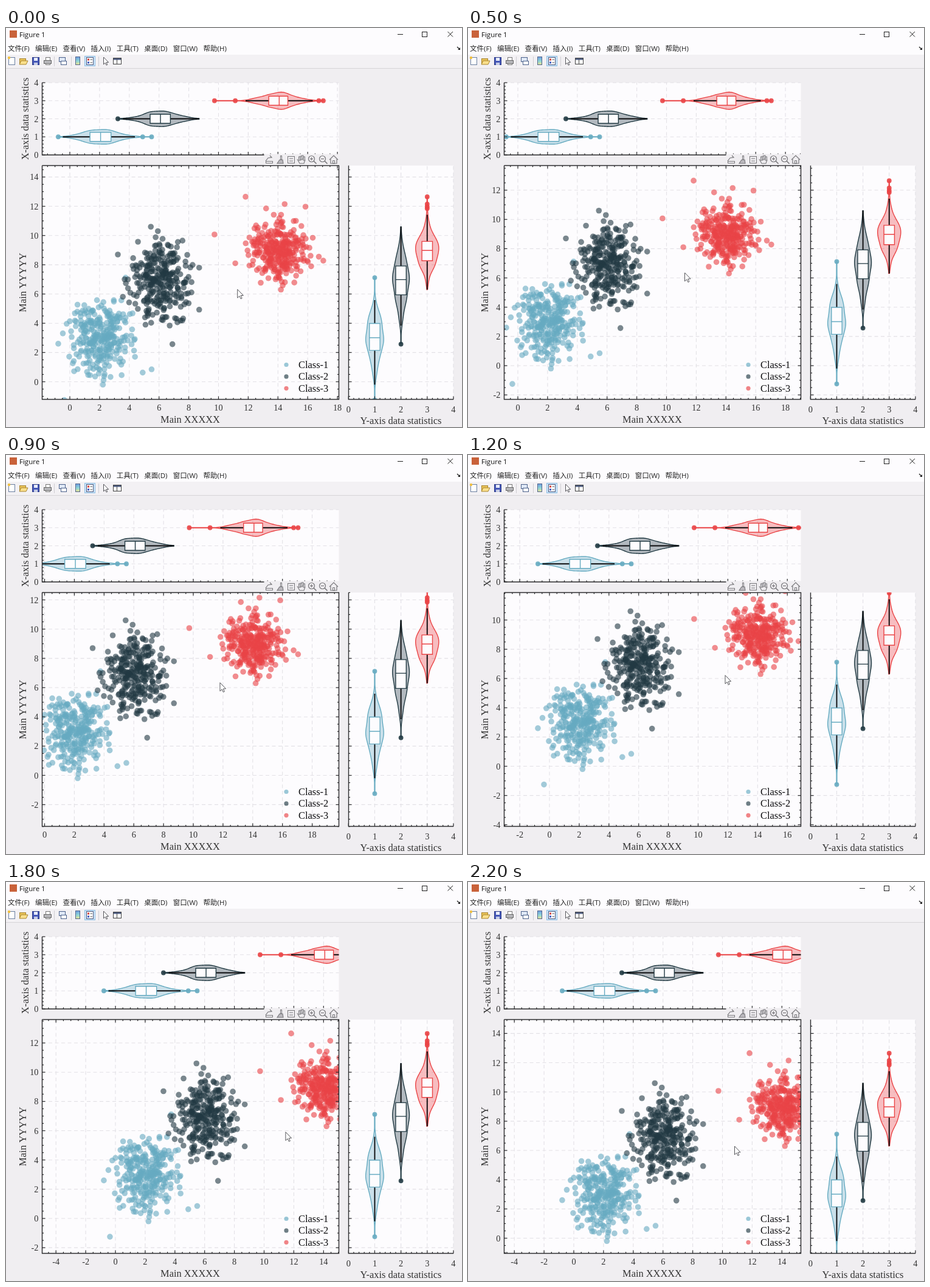
An HTML page with a canvas for the animation above (2.3 s loop, 750 by 657 pixels).

```html
<!DOCTYPE html>
<html lang="zh-CN">
<head>
<meta charset="utf-8">
<title>Figure 1</title>
<style>
html, body { margin: 0; width: 100%; height: 100%; overflow: hidden; background: #f0eef1 }
canvas { display: block }
</style>
</head>
<body>
<canvas id="stage" width="750" height="657"></canvas>
<script>
const g = document.getElementById('stage').getContext('2d');
const SERIF = '"Liberation Serif", "Times New Roman", serif';
const UI = '"Open Sans", "Noto Sans CJK SC", "Noto Sans CJK", sans-serif';
const INK = '#2b2b2d', PAPER = '#fdfcfe', BACK = '#f0eef1', GRID = '#e3e1e6';
const LOOP = 2300, STEP = 100, LAG = 60;

// Where the plot's zero point is dragged: time, x, y.
const DRAG = [
  [0, 105, 582.5], [500, 82, 556], [900, 63.5, 527.5], [1200, 134, 512.5],
  [1500, 174, 517.5], [1800, 180, 554], [2200, 174, 586.5], [2260, 160, 584]
];

// Each class is a round cloud plus a few far points.
const CLASSES = [
  { color: '#66abc1', centre: [2.07, 2.95], spread: [1.05, 1.36],
    far: [[-.78, 2.6], [-.37, -1.25], [4.9, .63], [5.5, .85], [3.75, 7.12]] },
  { color: '#223a43', centre: [6.02, 6.9], spread: [1.06, 1.44],
    far: [[3.23, 8.7], [6.9, 2.57], [5.45, 10.6], [8.7, 7.8], [8.7, 4.93]] },
  { color: '#ea4446', centre: [14.08, 8.97], spread: [1, 1.05],
    far: [[11.82, 12.65], [14.45, 12.15], [15.85, 11.97], [13.2, 11.85], [9.73, 10.07],
      [11.13, 8.1], [16.75, 8.55], [17.05, 8.28], [14.2, 6.3]] }
];

let seed = 7;
const random = () => (seed = seed * 16807 % 2147483647) / 2147483647;

// Normal cloud: evenly ranked radii, loosely spread angles.
function cloud({ centre, spread, far }, count = 290) {
  const list = Array.from({ length: count }, (_, k) => {
    const r = Math.sqrt(-2 * Math.log(1 - .95 * (k + .5) / count));
    const a = k * 2.39996 + random() * 2.5;
    return [centre[0] + spread[0] * r * Math.cos(a), centre[1] + spread[1] * r * Math.sin(a)];
  });
  return [...list.sort(() => random() - .5), ...far];
}

// Quartiles, whiskers, outliers and a smoothed density of one column.
function summarize(values) {
  const s = values.slice().sort((a, b) => a - b), n = s.length;
  const [q1, mid, q3] = [.25, .5, .75].map(q => s[Math.round(q * (n - 1))]);
  const reach = 1.5 * (q3 - q1);
  const normal = s.filter(v => v >= q1 - reach && v <= q3 + reach);
  const band = .34 * (q3 - q1) / 1.35;
  const outline = Array.from({ length: 81 }, (_, k) => {
    const v = s[0] + (s[n - 1] - s[0]) * k / 80;
    const sum = s.reduce((t, p) => t + Math.exp(-(((v - p) / band) ** 2) / 2), 0);
    return [v, sum / (n * band * Math.sqrt(2 * Math.PI))];
  });
  return { q1, mid, q3, lo: normal[0], hi: normal[normal.length - 1], outline,
    outliers: s.filter(v => !normal.includes(v)) };
}

for (const c of CLASSES) {
  c.points = cloud(c);
  c.stats = [0, 1].map(axis => summarize(c.points.map(p => p[axis])));
}

// Smooth curve through rows of [position, value...]; c picks the column.
function spline(rows, t, c) {
  const n = rows.length - 1;
  if (t <= rows[0][0]) return rows[0][c];
  if (t >= rows[n][0]) return rows[n][c];
  const gap = j => rows[j + 1][0] - rows[j][0];
  const slope = j => (rows[j + 1][c] - rows[j][c]) / gap(j);
  const tangent = j => j === 0 ? slope(0) : j === n ? slope(n - 1)
    : (gap(j) * slope(j - 1) + gap(j - 1) * slope(j)) / (gap(j) + gap(j - 1));
  const i = rows.findIndex(r => r[0] > t) - 1, h = gap(i), u = (t - rows[i][0]) / h, w = 1 - u;
  return w * w * (1 + 2 * u) * rows[i][c] + u * u * (3 - 2 * u) * rows[i + 1][c]
    + h * u * w * (w * tangent(i) - u * tangent(i + 1));
}

function rect(x, y, w, h, fill, stroke, width = 1) {
  if (fill) { g.fillStyle = fill; g.fillRect(x, y, w, h); }
  if (stroke) { g.strokeStyle = stroke; g.lineWidth = width; g.strokeRect(x, y, w, h); }
}

function path(list, stroke, width = 1, fill) {
  g.beginPath();
  list.forEach(p => g.lineTo(...p));
  if (fill) { g.closePath(); g.fillStyle = fill; g.fill(); }
  if (stroke) { g.strokeStyle = stroke; g.lineWidth = width; g.stroke(); }
}

const line = (x0, y0, x1, y1, color, width) => path([[x0, y0], [x1, y1]], color, width);

function disc(x, y, r, fill, stroke, width = 1.2) {
  g.beginPath();
  g.arc(x, y, r, 0, 7);
  if (fill) { g.fillStyle = fill; g.fill(); }
  if (stroke) { g.strokeStyle = stroke; g.lineWidth = width; g.stroke(); }
}

function faded(alpha, draw) {
  g.globalAlpha = alpha;
  draw();
  g.globalAlpha = 1;
}

// Returns the width of the text.
function text(s, x, y, size, { font = SERIF, align = 'left', color = '#333', turn = 0 } = {}) {
  g.save();
  g.translate(x, y);
  g.rotate(turn);
  g.font = `${size}px ${font}`;
  g.textAlign = align;
  g.fillStyle = color;
  g.fillText(s, 0, 0);
  const { width } = g.measureText(s);
  g.restore();
  return width;
}

// Visible multiples of a step; there are `parts` of them per unit of `major`.
function ticks(map, a, b, major, parts = 1) {
  const list = [];
  for (let k = -12 * parts; k <= 12 * parts; k++) {
    const v = k * major / parts;
    if (map(v) >= a - .8 && map(v) <= b + .8) list.push([v, k % parts ? 2.6 : 5]);
  }
  return list;
}

function panel([l, t, r, b], mapX, mapY, stepX, stepY, framed, draw) {
  rect(l, t, r - l, b - t, PAPER);
  g.setLineDash([6, 4.5]);
  for (const [v] of ticks(mapX, l, r, stepX)) line(mapX(v), b, mapX(v), t, GRID, 1.1);
  for (const [v] of ticks(mapY, t, b, stepY)) line(l, mapY(v), r, mapY(v), GRID, 1.1);
  g.setLineDash([]);
  g.save();
  g.beginPath();
  g.rect(l, t, r - l, b - t);
  g.clip();
  draw();
  g.restore();
  const parts = step => step === 1 ? 5 : 4;
  for (const [v, n] of ticks(mapX, l, r, stepX, parts(stepX))) {
    line(mapX(v), b, mapX(v), b - n, INK, 1.2);
    if (framed) line(mapX(v), t, mapX(v), t + n, INK, 1.2);
  }
  for (const [v, n] of ticks(mapY, t, b, stepY, parts(stepY))) {
    line(l, mapY(v), l + n, mapY(v), INK, 1.2);
    if (framed) line(r, mapY(v), r - n, mapY(v), INK, 1.2);
  }
  path(framed ? [[l, t], [l, b], [r, b], [r, t], [l, t]] : [[l, t], [l, b], [r, b]], INK, 1.4);
}

// at(value, offset) gives a place along and across the violin; unit is its lane in pixels.
function violin(color, { q1, mid, q3, lo, hi, outline, outliers }, unit, half, at) {
  const side = sign => outline.map(([v, d]) => at(v, sign * Math.max(.4, 1.17 * unit * d)));
  const shape = [...side(1), ...side(-1).reverse()];
  faded(.34, () => path(shape, null, 0, color));
  path([...shape, shape[0]], color, 1.4);
  path([at(lo, 0), at(hi, 0)], '#0c0c0e', 1.9);
  path([at(q1, half), at(q3, half), at(q3, -half), at(q1, -half), at(q1, half)], color, 1.4, PAPER);
  path([at(mid, half), at(mid, -half)], color, 1.4);
  faded(.9, () => outliers.forEach(v => disc(...at(v, 0), 3.9, color)));
}

function pointer(x, y, s) {
  const shape = [[0, 0], [0, 14], [3.2, 11], [5.4, 15.6], [7.4, 14.7], [5.3, 10.2], [9.6, 10], [0, 0]];
  path(shape.map(([a, b]) => [x + a * s, y + b * s]), '#55555a', 1, '#fff');
}

function chrome() {
  rect(0, 0, 750, 66, PAPER);
  rect(0, 44, 750, 22, '#f3f1f4');
  line(0, 66.5, 750, 66.5, '#d6d4d8');
  rect(6, 4, 12, 12, '#c9623a');
  text('Figure 1', 22, 14.5, 11.5, { font: UI, color: '#111' });
  line(644, 10.5, 653, 10.5, '#222');
  rect(684.5, 6.5, 8, 8, null, '#222');
  line(726.5, 6, 735, 14.5, '#222');
  line(735, 6, 726.5, 14.5, '#222');
  let x = 3;
  for (const name of ['文件(F)', '编辑(E)', '查看(V)', '插入(I)', '工具(T)', '桌面(D)', '窗口(W)', '帮助(H)'])
    x += text(name, x, 37.5, 11.5, { font: UI, color: '#222' }) + 9.3;
  line(742, 31, 746, 35, '#222', 1.3);
  path([[747, 32], [747, 36], [743, 36]], null, 0, '#222');

  // new, open, save, print
  rect(4.5, 48.5, 10, 12, '#fff', '#6b7fa0');
  disc(5, 49, 2.2, '#f0c040');
  rect(22.5, 50.5, 10, 9, '#e9c35a', '#a8842c');
  path([[22, 60], [25, 54], [36, 54], [33, 60], [22, 60]], '#a8842c', 1, '#fbe08c');
  rect(43.5, 48.5, 11, 12, '#4658b8', '#2c3a86');
  rect(46, 49, 6, 5, '#e8ecfa');
  rect(46, 57, 6, 4, '#c5cbe4');
  rect(65.5, 48.5, 7, 12, '#fff', '#777');
  rect(62.5, 53.5, 12, 5, '#b9b9bd', '#666');
  for (const x of [79.5, 107.5, 152.5]) line(x, 47, x, 63, '#cfcdd2');
  // link, colour bar, legend
  rect(87.5, 48.5, 10, 7, '#dfe8f6', '#4c628c');
  rect(90.5, 54.5, 9, 6, '#fff', '#4c628c');
  const bar = g.createLinearGradient(0, 48, 0, 61);
  ['#6f9fe0', '#8fd6d6', '#f4e58a'].forEach((c, i) => bar.addColorStop(i / 2, c));
  rect(114.5, 47.5, 7, 13, bar, '#52668c');
  rect(129.5, 46.5, 17, 16, '#cfe5f7', '#8fc0e6');
  rect(132.5, 48.5, 11, 12, '#fff', '#44557c');
  ['#d8433c', '#3c58c0'].forEach((c, i) => {
    rect(134, 50.5 + 5 * i, 3, 3, c);
    line(138.5, 52 + 5 * i, 142, 52 + 5 * i, '#555');
  });
  // edit arrow, inspector
  pointer(160.5, 48, .85);
  rect(176.5, 49.5, 13, 10, '#fff', '#444');
  rect(177, 50, 12, 2.5, '#4b5a80');
  line(182.5, 52, 182.5, 60, '#444');
}

function axesTools() {
  const c = '#77767a';
  rect(424.5, 207.5, 125, 18, BACK);
  // export, brush, note, hand
  path([[427, 219], [431, 214], [437, 213], [434, 210]], c, 1.2);
  rect(427.5, 219.5, 11, 3, null, c);
  rect(451.5, 210.5, 2, 6, null, c);
  path([[450, 217], [455, 217], [456, 223], [446, 223], [450, 217]], c, 1.1, '#bbb9be');
  rect(463.5, 211.5, 11, 11, null, c);
  for (const y of [215, 219]) line(466, y, 472, y, c);
  for (let i = 0; i < 4; i++) rect(481.5 + 2.5 * i, 212 - i % 3, 2.5, 6, null, c);
  path([[479, 216], [483, 223], [490, 223], [492, 217]], c, 1.1);
  // zoom in, zoom out, home
  for (const x of [502.5, 520.5]) {
    disc(x, 215.5, 5, null, c);
    line(x + 3.5, 219, x + 8, 223.5, c, 1.6);
    line(x - 2.5, 215.5, x + 2.5, 215.5, c, 1.2);
  }
  line(502.5, 213, 502.5, 218, c, 1.2);
  path([[532, 217], [539, 210], [546, 217]], c, 1.2);
  path([[534, 216], [534, 223], [544, 223], [544, 216]], c, 1.2);
  rect(537.5, 218.5, 3, 4.5, null, c);
}

function draw(time) {
  const at = (t, c) => spline(DRAG, t, c);
  const ox = at(time, 1), oy = at(time, 2);
  const X = v => ox + v * 24.45, Y = v => oy - v * 24.08;
  const T = v => 209 - v * 29.75, R = v => 563.3 + v * 43.15;

  rect(0, 0, 750, 657, BACK);
  chrome();
  panel([59.5, 90, 547.5, 209], X, T, 2, 1, false, () => CLASSES.forEach(({ color, stats }, i) =>
    violin(color, stats[0], 29.75, 7.5, (v, w) => [X(v), T(i + 1) + w])));
  panel([563.5, 226.5, 736, 611.5], R, Y, 1, 2, false, () => CLASSES.forEach(({ color, stats }, i) =>
    violin(color, stats[1], 43.15, 8.7, (v, w) => [R(i + 1) + w, Y(v)])));
  panel([59.5, 226.5, 547.5, 611.5], X, Y, 2, 2, true, () => faded(.6, () =>
    CLASSES.forEach(({ color, points }) => points.forEach(([x, y]) => disc(X(x), Y(y), 4.8, color)))));
  axesTools();

  CLASSES.forEach(({ color }, i) => {
    const y = 554.5 + i * 19.4;
    faded(.65, () => disc(461, y, 3.6, color));
    text('Class-' + (i + 1), 481, y + 5.5, 16.4, { color: '#0c0c0e' });
  });

  const mid = { align: 'center' }, end = { align: 'right' }, up = { align: 'center', turn: -Math.PI / 2 };
  for (const [v] of ticks(X, 59, 548, 2)) text(v, X(v), 630, 14.3, mid);
  for (const [v] of ticks(Y, 227, 611, 2)) text(v, 53.5, Y(v) + 5, 14.3, end);
  for (let v = 0; v < 5; v++) {
    text(v, 53.5, T(v) + 5, 14.3, end);
    text(v, R(v), 632.5, 14.3, mid);
  }
  text('Main XXXXX', 303, 650, 16.4, mid);
  text('Y-axis data statistics', 649.5, 652, 16.4, mid);
  text('Main YYYYY', 32.5, 419, 16.4, up);
  text('X-axis data statistics', 36.5, 149.5, 16.4, up);

  // The pointer runs slightly ahead of the plot it drags.
  pointer(at(time + LAG, 1) + 278.5, at(time + LAG, 2) - 149, 1);
}

const start = performance.now();
function tick() {
  const time = (performance.now() - start) % LOOP;
  draw(Math.floor(time / STEP) * STEP);
  requestAnimationFrame(tick);
}
tick();
</script>
</body>
</html>
```
